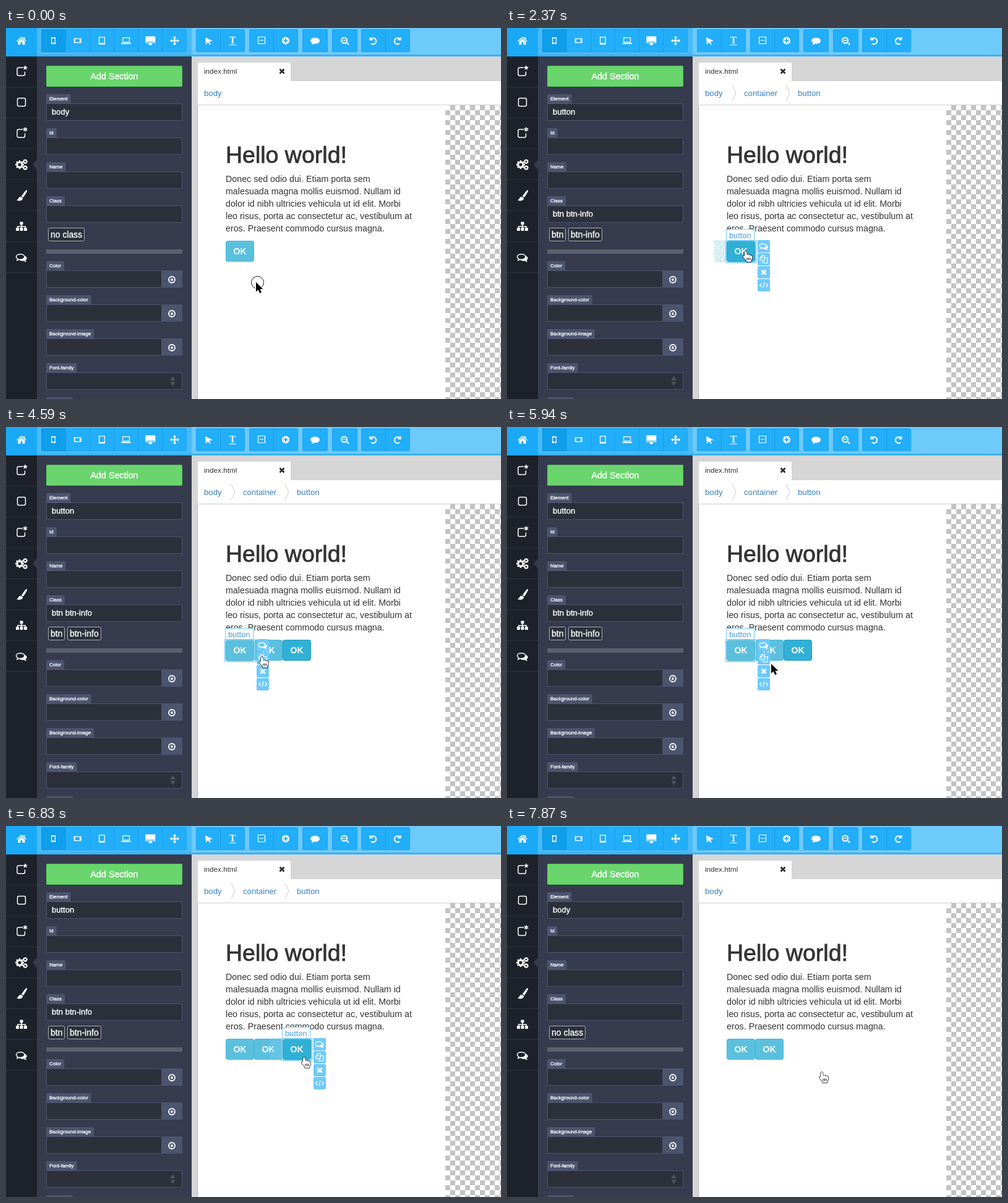
Recreate the animation shown at these times as an HTML page with a canvas. Size 800 px wide and 600 px high, loop 8000 ms.

```html
<!DOCTYPE html>
<html lang="en">
<head>
<meta charset="utf-8">
<title>Page editor</title>
<style>
html, body { margin: 0; width: 100%; height: 100%; overflow: hidden; }
canvas { display: block; }
</style>
</head>
<body>
<canvas id="stage" width="800" height="600"></canvas>
<script>
const ctx = document.getElementById('stage').getContext('2d');
const LOOP = 8000;
const SANS = '"Liberation Sans", Arial, sans-serif';
const BLUE = '#22aef9', PALE = '#6ecafb', PANEL = '#363b4e', FIELD = '#2b303b', EDGE = '#4c546e';

// Filled shapes (even-odd), centred on 0,0
const FILLED = {
  home: 'M-8 0L0-7 3-4.4V-6H5.5V-2L8 0 7 1 0-5-7 1ZM-5.5 1L0-3.7 5.5 1V6H1.5V2H-1.5V6H-5.5Z',
  phone: 'M-3.5-5.5H3.5V5.5H-3.5ZM-2.3-3.8V3.2H2.3V-3.8Z',
  phoneWide: 'M-6-3.7H6V3.7H-6ZM-4-2.5V2.5H3.4V-2.5Z',
  tablet: 'M-5-6.3H5V6.3H-5ZM-3.7-5V3.8H3.7V-5Z',
  laptop: 'M-6-5.5H6V3H-6ZM-4.8-4.3V1.8H4.8V-4.3ZM-8 3.8H8V5.5H-8Z',
  desktop: 'M-8-7H8V4H2L3 7H-3L-2 4H-8ZM-7 1.8V3H7V1.8Z',
  move: 'M0-7.5L3-4.5H1V-1H4.5V-3L7.5 0 4.5 3V1H1V4.5H3L0 7.5-3 4.5H-1V1H-4.5V3L-7.5 0-4.5-3V-1H-1V-4.5H-3Z',
  pointer: 'M-5-6L7 0 1.5 1 4 5 2 6-.5 2-4 6Z',
  plus: 'M-6 0A6 6 0 1 0 6 0A6 6 0 1 0-6 0ZM-1-3.5H1V-1H3.5V1H1V3.5H-1V1H-3.5V-1H-1Z',
  comment: 'M-7.5-.5C-7.5-7 7.5-7 7.5-.5C7.5 3.5 2 5.2-1.5 4.2C-3 5.8-5 6.2-6 6C-5 5-4.5 4-4.7 3C-6.5 2-7.5 1-7.5-.5Z',
  star: 'M0-4L1.1-1.3 4-1 1.8.9 2.5 3.8 0 2.2-2.5 3.8-1.8.9-4-1-1.1-1.3Z',
  brush: 'M8.5-9C10-8 9-6 3 3L0 1C4-5 7-9 8.5-9ZM-1 1.8L2.3 4C2 8-2 9.5-8 7.5C-5 6.5-5 2-1 1.8Z',
  sitemap: 'M-2.5-7.5H2.5V-3H.8V-.8H7V2H9V7H4V2H5.6V.7H.8V2H2.5V7H-2.5V2H-.8V.7H-5.6V2H-4V7H-9V2H-7V-.8H-.8V-3H-2.5Z',
  close: 'M-4.5-2.5L-2.5-4.5 0-2 2.5-4.5 4.5-2.5 2 0 4.5 2.5 2.5 4.5 0 2-2.5 4.5-4.5 2.5-2 0Z',
  tail: 'M5.5-3.2C11-1 9.5 3 7 3.8C7 5 8 6 9 6.5C7 7 5 6 4 5C1 5.5-2 5-3 3.8C3 4 7 1 5.5-3.2Z',
  sort: 'M-4-1.2L0-8 4-1.2ZM-4 1.2H4L0 8Z'
};
// Outlined shapes
const LINED = {
  square: 'M-4-6.5H4Q6.5-6.5 6.5-4V4Q6.5 6.5 4 6.5H-4Q-6.5 6.5-6.5 4V-4Q-6.5-6.5-4-6.5Z',
  openSquare: 'M2-6.5H-4.5Q-7-6.5-7-4V4Q-7 6.5-4.5 6.5H3Q5.5 6.5 5.5 4V0',
  minusBox: 'M-5.5-5.5H5.5V5.5H-5.5ZM-3.3 0H3.3',
  asterisk: 'M0-3.6V3.6M-3.2-1.9L3.2 1.9M-3.2 1.9L3.2-1.9',
  zoomOut: 'M-6-1A4.5 4.5 0 1 0 3-1A4.5 4.5 0 1 0-6-1M2 2L6 6M-3.5-1H.5',
  undo: 'M-4.5-2.5A5 5 0 1 1-3.5 4M-5-6V-2H-1',
  bubble: 'M-8-1.5C-8-7.2 5.5-7.2 5.5-1.5C5.5 2.2 0 3.4-3 2.7L-6.5 4.2-5.5 1.8C-7 1-8 0-8-1.5Z',
  copy: 'M-6-2L-3-6H1V2H-6ZM-3-6V-2H-6M-1 2V6H6V-2.5H1',
  code: 'M-3.5-3L-6.5 0-3.5 3M3.5-3L6.5 0 3.5 3M1-4.5L-1 4.5',
  ring: 'M-5 0A5 5 0 1 0 5 0A5 5 0 1 0-5 0'
};
const ARROW = 'M0 0V15.5L3.6 12.2 6.2 18 9 16.8 6.5 11.2H11.3Z';
const HAND = 'M-2 1.2C-2-.5 1-.5 1.3 1.2L2 6C3 5 5 5 5 6.5C6 5.5 8 6 8 7.5C9 6.5 10.3 7 10.3 8.5V12L8.5 14.5V17H1V15L-3.5 10.5C-5.5 8-3.5 6.3-2 8Z';

function rect(x, y, w, h, fill, border, radius = 0) {
  ctx.beginPath();
  ctx.roundRect(x, y, w, h, radius);
  if (fill) { ctx.fillStyle = fill; ctx.fill(); }
  if (!border) return;
  ctx.beginPath();
  ctx.roundRect(x + .5, y + .5, w - 1, h - 1, radius);
  ctx.strokeStyle = border; ctx.lineWidth = 1; ctx.stroke();
}
function line(color, width, ...points) {
  ctx.beginPath();
  points.forEach(p => ctx.lineTo(...p));
  ctx.strokeStyle = color; ctx.lineWidth = width; ctx.stroke();
}
// `heavy` thickens regular type to a medium weight
function text(str, x, y, size, color, { weight = '', heavy = 0, align = 'left', family = SANS } = {}) {
  ctx.font = `${weight} ${size}px ${family}`;
  ctx.textAlign = align;
  ctx.fillStyle = color;
  ctx.fillText(str, x, y);
  if (heavy) { ctx.strokeStyle = color; ctx.lineWidth = heavy; ctx.strokeText(str, x, y); }
  return ctx.measureText(str).width;
}
function icon(name, x, y, { color = '#fff', scale = 1, flip = 1, width = 1.5 } = {}) {
  ctx.save();
  ctx.translate(x, y);
  ctx.scale(scale * flip, scale);
  if (FILLED[name]) {
    ctx.fillStyle = color;
    ctx.fill(new Path2D(FILLED[name]), 'evenodd');
  } else {
    ctx.strokeStyle = color; ctx.lineWidth = width;
    ctx.stroke(new Path2D(LINED[name]));
  }
  ctx.restore();
}
function comments(x, y, scale = 1) {
  icon('bubble', x, y, { scale });
  icon('tail', x, y, { scale });
}
function gear(x, y, r) {
  ctx.save();
  ctx.translate(x, y);
  ctx.beginPath();
  ctx.arc(0, 0, r * .58, 0, 7);
  ctx.strokeStyle = '#fff'; ctx.lineWidth = r * .42; ctx.stroke();
  for (let i = 0; i < 8; i++) {
    ctx.rotate(Math.PI / 4);
    ctx.fillStyle = '#fff';
    ctx.fillRect(-r * .18, -r, r * .36, r * .35);
  }
  ctx.restore();
}

function toolGroup(x, count, activeFirst) {
  const w = count > 2 ? 235 : count > 1 ? 79 : 41;
  rect(x, 2, w, 37, BLUE, '#1ba5f0', 2);
  if (activeFirst) rect(x, 2, 40, 37, '#0f9eea', '#0d92da', 2);
  for (let i = 1; i < count; i++) rect(x + i * w / count | 0, 3, 1, 35, '#169fea');
}
function topBar() {
  rect(0, 0, 800, 46, PALE);
  rect(0, 0, 300, 46, '#48baf8');
  rect(0, 43, 800, 3, '#38b2f4');
  rect(0, 0, 50, 46, '#19a9f7');
  toolGroup(57, 6, true);
  [[307, 2], [393, 2], [479, 1], [527, 1], [574, 2]].forEach(g => toolGroup(...g));
  icon('home', 25, 21);
  ['phone', 'phoneWide', 'tablet', 'laptop', 'desktop', 'move'].forEach((n, i) => icon(n, 76.5 + i * 39.2, 20.5));
  icon('pointer', 327, 21);
  text('T', 366, 25, 16, '#fff', { weight: 'bold', align: 'center', family: '"Liberation Serif", serif' });
  line('#fff', 1, [360, 27.5], [372, 27.5]);
  icon('minusBox', 413, 20, { width: 1.2 });
  icon('plus', 452, 20.5);
  icon('comment', 499.5, 21);
  icon('zoomOut', 548, 21, { width: 2 });
  icon('undo', 593.5, 21, { width: 2 });
  icon('undo', 632.5, 21, { width: 2, flip: -1 });
}
function rail() {
  rect(0, 46, 50, 554, '#1d2129');
  for (let y = 95; y < 400; y += 50) rect(0, y, 50, 1, '#2c313b');
  icon('openSquare', 25, 70.5);
  icon('star', 31, 64);
  icon('square', 25, 120);
  icon('openSquare', 25, 170.5);
  icon('asterisk', 31, 164);
  gear(22, 221, 7);
  gear(31, 216, 4);
  gear(31, 226, 4);
  icon('brush', 25, 271);
  icon('sitemap', 25, 321);
  comments(24.5, 371.5);
}
function field(label, y, value = '', extra) {
  ctx.font = `8px ${SANS}`;
  rect(65, y, ctx.measureText(label).width + 10, 16, EDGE, null, [2, 2, 0, 0]);
  text(label, 70, y + 10, 8, '#fff', { heavy: .3 });
  rect(65, y + 15, 220, 28, FIELD, EDGE);
  text(value, 74, y + 33, 13, '#fff', { heavy: .35 });
  if (extra === 'pick') {
    rect(251, y + 15, 34, 28, EDGE, null, [0, 2, 2, 0]);
    icon('ring', 268, y + 30, { width: 1.8 });
    rect(266, y + 28, 4, 4, '#fff', null, 2);
  } else if (extra) icon('sort', 269.5, y + 29, { color: '#515763' });
}
function panel(selected) {
  rect(50, 46, 250, 554, PANEL);
  ctx.fillStyle = PANEL;
  ctx.fill(new Path2D('M50 213L43 221 50 229Z'));
  rect(65, 61, 220, 34, '#69d56c', '#4fc653', 2);
  text('Add Section', 175, 83, 14.25, '#fff', { heavy: .4, align: 'center' });
  field('Element', 107, selected ? 'button' : 'body');
  field('Id', 162);
  field('Name', 217);
  field('Class', 272, selected ? 'btn btn-info' : '');
  let x = 68;
  for (const chip of selected ? ['btn', 'btn-info'] : ['no class']) {
    ctx.font = `14px ${SANS}`;
    const w = Math.round(ctx.measureText(chip).width + 8);
    rect(x, 323, w, 22, FIELD, '#aeb0b3', 2);
    text(chip, x + 4, 339, 14, '#fff', { heavy: .3 });
    x += w + 4;
  }
  rect(65, 358, 220, 7, '#5c606e');
  ['Color', 'Background-color', 'Background-image'].forEach((l, i) => field(l, 377 + i * 55, '', 'pick'));
  field('Font-family', 542, '', 'sort');
  field('Font-size', 597);
}

function page(selected) {
  rect(300, 46, 500, 554, '#d6d6d6');
  rect(310, 56, 150, 30, '#fff', null, [2, 2, 0, 0]);
  rect(310, 86, 490, 38, '#fff');
  rect(310, 124, 490, 1, '#ccc');
  rect(309, 125, 1, 475, '#b4b4b4');
  rect(310, 125, 490, 475, '#fff');
  ctx.fillStyle = '#c3c3c3';
  for (let row = 0; row < 60; row++)
    for (let col = (row + 1) % 2; col < 12; col += 2) ctx.fillRect(710 + col * 8, 125 + row * 8, 8, 8);
  text('index.html', 320, 74, 11.7, '#333');
  icon('close', 446, 70, { color: '#2b303b' });
  const crumbs = [['body', 320], ['container', 383], ['button', 470]];
  crumbs.slice(0, selected ? 3 : 1).forEach(([name, x], i) => {
    text(name, x, 110, 13.2, '#3a7fb8');
    if (i) line('#ccc', 1, [x - 19, 92], [x - 13, 105], [x - 19, 118]);
  });
  text('Hello world!', 355, 218, 37.5, '#333', { heavy: .8 });
  ['Donec sed odio dui. Etiam porta sem',
    'malesuada magna mollis euismod. Nullam id',
    'dolor id nibh ultricies vehicula ut id elit. Morbi',
    'leo risus, porta ac consectetur ac, vestibulum at',
    'eros. Praesent commodo cursus magna.'
  ].forEach((l, i) => text(l, 355, 249 + i * 20, 14.25, '#333'));
}
function okButton(x, dark) {
  rect(x, 344, 46, 34, dark ? '#31b0d5' : '#5bc0de', dark ? '#269abc' : '#46b8da', 4);
  text('OK', x + 23, 366, 14, '#fff', { weight: 'bold', align: 'center' });
}
function hatch(x) {
  ctx.save();
  ctx.beginPath();
  ctx.rect(x, 343, 20, 36);
  ctx.clip();
  for (let d = 0; d < 56; d += 4) line('#82d0f7', 1, [x - 36 + d, 379], [x + d, 343]);
  ctx.restore();
}
function tag(name, x, y) {
  ctx.font = `12.8px ${SANS}`;
  rect(x, y, Math.round(ctx.measureText(name).width + 10), 19, '#fff', PALE);
  text(name, x + 5, y + 15, 12.8, '#4b9bd6');
}
function buttonTools(x) {
  for (let i = 0; i < 4; i++) rect(x, 343 + i * 21, 20, 20, PALE, null, 2);
  comments(x + 9.5, 353.5, .8);
  icon('copy', x + 10, 374, { width: 1.2 });
  icon('close', x + 10, 395);
  icon('code', x + 10, 416, { width: 1.2 });
}
function undoTip() {
  rect(546, 47, 96, 38, '#17181a', null, 4);
  ctx.fill(new Path2D('M589 47L594 42 599 47Z'));
  text('Undo', 594, 62, 12, '#fff', { align: 'center', heavy: .2 });
  text('(shortcut cmd + z)', 594, 78, 10, '#fff', { align: 'center', heavy: .3 });
}

// Each move: start, time of last step, step count, evenly timed waypoints
const MOVES = [
  [740, 1180, 4, [[404, 411], [379, 358]]],
  [2370, 2950, 5, [[379, 358], [414, 372]]],
  [5940, 6830, 7, [[414, 372], [427, 383], [443, 402], [461, 419], [477, 403], [484, 376], [482, 374], [482, 374]]],
  [7130, 7280, 2, [[482, 374], [509, 398]]]
];
function cursorAt(t) {
  let pos = MOVES[0][3][0];
  for (const [start, end, steps, path] of MOVES) {
    if (t < start) break;
    const done = Math.min(steps, 1 + Math.floor((t - start) / (end - start) * (steps - 1) + .05));
    const along = done / steps * (path.length - 1);
    const i = Math.min(path.length - 2, Math.floor(along + 1e-6)), f = along - i;
    pos = [0, 1].map(k => Math.round(path[i][k] + (path[i + 1][k] - path[i][k]) * f));
  }
  return pos;
}
function cursor(t) {
  const [x, y] = cursorAt(t);
  const hand = within(t, 1030, 5940) || t >= 6530;
  if ([[0, 140], [1630, 1920], [3250, 3390], [6680, 6830], [7720, 7870]].some(c => within(t, ...c))) {
    ctx.beginPath();
    ctx.arc(x + (hand ? 1 : 2.5), y + .5, 10, 0, 7);
    ctx.fillStyle = 'rgba(255,255,255,.4)'; ctx.fill();
    ctx.strokeStyle = '#111'; ctx.lineWidth = 1; ctx.stroke();
  }
  ctx.save();
  ctx.translate(x, y);
  const shape = new Path2D(hand ? HAND : ARROW);
  ctx.lineJoin = 'round';
  ctx.strokeStyle = hand ? '#000' : '#fff'; ctx.lineWidth = hand ? 1.3 : 2;
  ctx.stroke(shape);
  ctx.fillStyle = hand ? '#fff' : '#000';
  ctx.fill(shape);
  if (hand) for (const gx of [2, 4.5, 7]) line('#000', 1, [gx, 10.5], [gx, 14]);
  ctx.restore();
}
const within = (t, from, to) => t >= from && t < to;

function draw(t) {
  const selected = within(t, 1770, 7720);
  const current = t >= 6530 ? 2 : 0;
  const count = 1 + (t >= 3250) + (t >= 4590) - (t >= 7720);
  const dark = [within(t, 1030, 3250), false, within(t, 4590, 6090) || within(t, 6530, 7130)];
  const inContainer = within(t, 6090, 6530) || within(t, 7130, 7720);
  const inButton = within(t, 1030, 7720) && !inContainer;
  const toolsOn = t >= 6680 ? 2 : 0;
  const x = 355 + 46 * current;

  page(selected);
  for (let i = 0; i < count; i++) okButton(355 + 46 * i, dark[i]);
  if (inContainer) {
    rect(339, 153, 335, 246, null, PALE);
    tag('container', 340, 135);
  }
  if (inButton) {
    if (!within(t, 4590, 6530)) { hatch(x - 20); hatch(x + 46); }
    rect(x - 1, 343, 48, 36, null, PALE, 2);
    tag('button', x - 1, 325);
  }
  if (selected) {
    const left = 355 + 46 * toolsOn;
    rect(left - 2, 343, 50, 37, null, PALE);
    ctx.setLineDash([1, 2]);
    rect(left - 1, 344, 48, 35, null, '#fff');
    ctx.setLineDash([]);
    buttonTools(left + 50);
  }
  rail();
  panel(selected);
  topBar();
  if (within(t, 890, 1630)) undoTip();
  cursor(t);
}
function tick() {
  draw(performance.now() % LOOP);
  requestAnimationFrame(tick);
}
tick();
</script>
</body>
</html>
```
